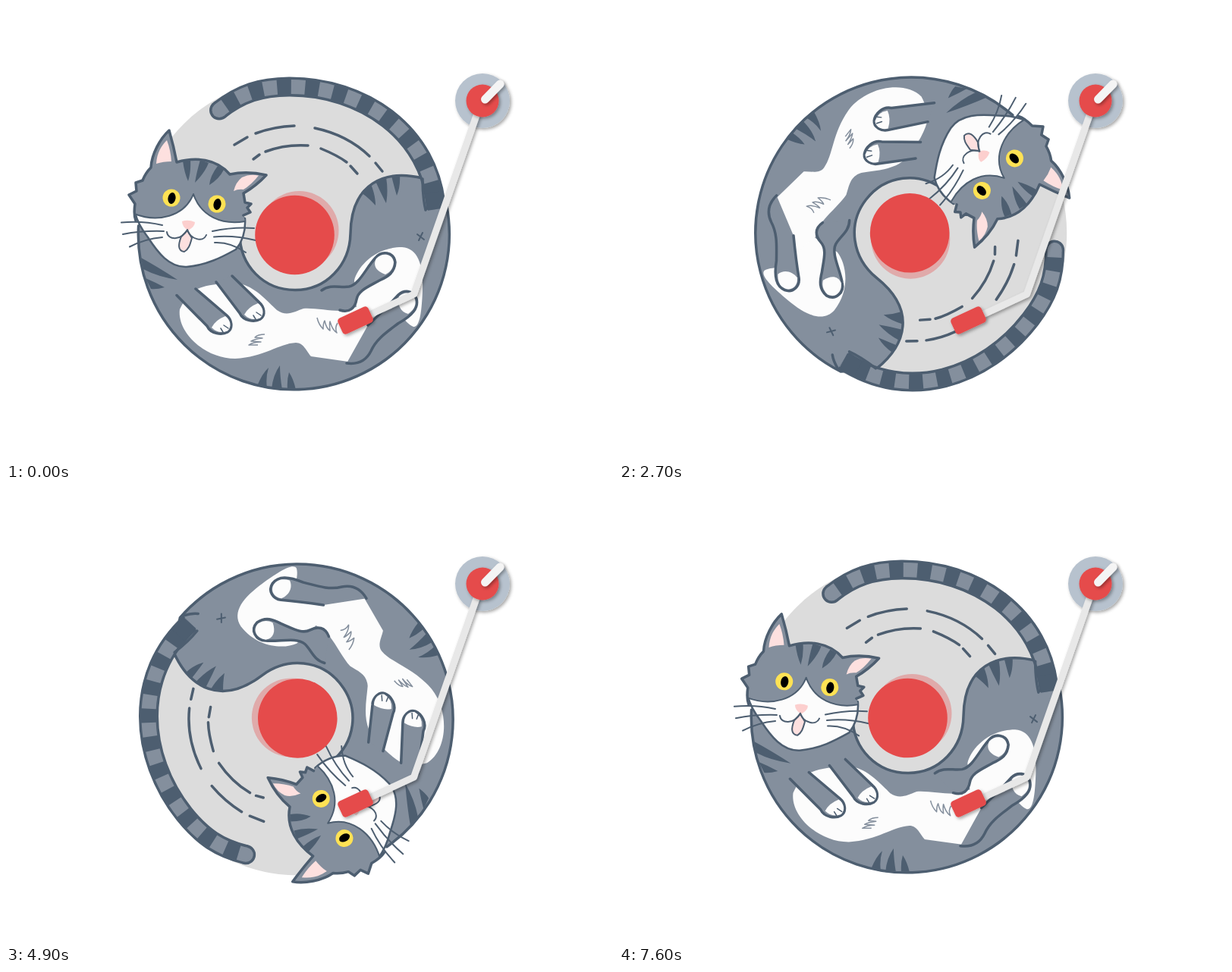
Animation of 800x600 px, one loop 7.7 s. Source, as an HTML page:

```html
<!DOCTYPE html>
<html lang="en">
<head>
<meta charset="utf-8">
<title>Cat record</title>
<style>
  html, body { margin: 0; width: 100%; height: 100%; overflow: hidden; background: #fff; }
  svg { display: block; width: 100vw; height: 100vh; }
  .line { fill: none; stroke: #4d5e70; stroke-linecap: round; stroke-linejoin: round; }
  .bold { stroke: #4d5e70; stroke-width: 3.5; stroke-linecap: round; stroke-linejoin: round; }
  .thin { stroke: #4d5e70; stroke-width: 2; stroke-linecap: round; stroke-linejoin: round; }
  .fur { fill: #848f9d; }
  .dark { fill: #4d5e70; }
  .white { fill: #fcfcfc; }
  .pink { fill: #fde0df; }
  .red { fill: #e54b4b; }
  .none { fill: none; }
</style>
</head>
<body>
<svg viewBox="0 0 800 600">
  <defs>
    <filter id="shadow" filterUnits="userSpaceOnUse" x="400" y="60" width="300" height="400">
      <feDropShadow dx="2" dy="2" stdDeviation="2" flood-color="#000" flood-opacity=".36"/>
    </filter>
    <path id="tailLine" d="M281 137.500C310 115 335 107 373 106.500C470 106 560 167 567 268"/>
  </defs>

  <g id="record">
    <circle cx="379.300" cy="301" r="205.500" fill="#dcdcdc"/>
    <path class="bold none" d="M301 183L318 173M329 168Q353 159 380 158M407 161Q450 170 479 198M487 207L496 218
      M326 202L334 196M342 192Q368 182 398 184M415 188Q437 197 449 206M454 211L463 221"/>

    <!-- body -->
    <path class="fur bold" d="M174.600 290A205 205 0 1 0 580.600 262L549 227
      C500 215 455 233 454 300C453 342 422 374.500 381 374.500C340 374.500 308 343 308 300L300 260Z"/>
    <path class="dark" d="M468 246Q478 253 487 263Q487 250 481 235ZM487 231Q494 247 501 260Q504 244 501 226Z
      M508 224Q512 240 515 250Q520 238 519 223Z
      M331 501Q338 484 346 477Q342 490 344 504ZM350 505Q352 486 361 474Q361 488 364 506ZM371 506Q370 493 373 483Q379 492 382 506Z
      M178 332Q200 344 226 361Q200 357 181 347ZM184 359Q196 364 209 371Q198 374 191 373Z"/>

    <!-- belly and hind legs -->
    <path class="white" d="M229 400C236 385 243 377 250 374C268 366 292 365 311 367C330 372 345 390 357 401
      C370 410 380 403 392 399C405 398 425 402 440 402L470 395L520 380L512 393L470 440L451 469L402 462
      C396 455 392 444 382 444C360 445 340 463 302 465C262 465 225 430 229 400Z"/>
    <path class="white" d="M459 362C463 345 485 318 522 318C545 320 550 345 549 375C548 400 546 424 537 423C530 420 526 414 520 408L462 398Z"/>
    <path class="fur bold" d="M416 375C428 366 440 372 452 370C466 367 474 346 487 332C495 322 511 324 513 338
      C512 352 503 357 492 362C478 370 464 375 462 387C460 398 453 405 440 401"/>
    <path class="white" d="M488 333C496 325 509 326 511 338C510 347 506 351 500 354C488 350 483 342 488 333Z"/>
    <path class="fur bold" d="M449 471C464 473 475 467 481 455C488 439 502 430 517 418.500C536 408 544 398 541 386
      C537 374 524 374 517 381C505 394 495 404 477 421"/>
    <path class="white" d="M518 383C525 376 536 377 539 387C541 395 537 401 530 406C520 404 515 393 518 383Z"/>
    <path class="none" stroke="#848f9d" stroke-width="1.500" stroke-linejoin="round" d="M410 411Q412 420 418 426Q418 418 420 415Q422 425 427 428Q426 419 427 416Q430 427 436 431Q433 424 437 418
      M341 433Q332 433 328 437L338 438Q328 439 323 442L336 443Q326 443 320 447L332 447"/>
    <path class="thin none" d="M542 301L551 308M549 299L544 309"/>

    <!-- tail -->
    <use href="#tailLine" class="line" style="stroke-width:26;stroke-linecap:butt"/>
    <circle class="dark" cx="281" cy="137.500" r="13"/>
    <use href="#tailLine" fill="none" stroke="#848f9d" stroke-width="19" stroke-dasharray="18.400" stroke-dashoffset="8.500"/>
    <circle class="fur" cx="281" cy="137.500" r="9.500"/>
    <path class="line" style="stroke-width:22;stroke-linecap:butt" d="M563.500 246L567 268"/>
    <path class="bold none" d="M549 228Q549 252 553 269M580 267Q576 278 570 284"/>

    <g id="forelegs"></g>

    <!-- head -->
    <path class="white thin" style="stroke-width:2.500" d="M170 272C173 285 180 296 187 305C200 325 215 345 238 344C264 342 285 331 303 321C312 310 316 296 315 280L247 246Z"/>
    <path class="fur" d="M169 274L170 261L162 249L172 244L171 233L180 230Q184 220 191 213C192 195 203 175 215 164
      Q221 185 225 206C250 199 277 201 295 222Q318 217 343 223Q330 237 313 247L315 259L323 261L318 266L322 272L313 276L315 284
      C285 289 257 278 247 248C235 278 200 286 169 274Z"/>
    <path class="thin none" d="M169 274C200 286 235 278 247 248C257 278 285 289 315 284"/>
    <path class="bold none" d="M171 283Q168 275 170 261L162 249L172 244L171 233L180 230Q184 220 191 213C192 195 203 175 215 164
      Q221 185 225 206C250 199 277 201 295 222Q318 217 343 223Q330 237 313 247L315 259L323 261L318 266L322 272L313 276"/>
    <path class="pink" d="M198 208C199 193 205 184 212 177Q217 190 218 205Q207 205 198 208Z
      M300 244Q303 232 311 226Q321 221 333 223.500Q323 236 313 242Q306 241 300 244Z"/>
    <path class="dark" d="M233 204Q235 220 240 231Q244 218 243 203ZM256 203Q251 220 249 233Q262 220 267 207ZM279 211Q269 224 268 236Q281 228 287 216Z"/>
    <g id="eyes"></g>
    <path fill="#fccfce" d="M232 284Q240 281 249 285Q249 291 240 296Q232 291 232 284Z"/>
    <path class="pink thin" d="M239 296L231 304C227 314 226 323 235 324C242 320 243 312 245 306Z"/>
    <path class="thin none" d="M212 298C213 309 231 310 239 295C243 308 260 312 264 302"/>
    <path class="thin none" d="M152 285.500Q180 283 206 289M154 301Q180 296 208 297M163 317.500Q183 307 206 305
      M272 297Q300 291 327 293M274 304.500Q300 302 329 309M275 312Q296 311 316 325"/>

    <!-- label -->
    <circle class="red" cx="386.500" cy="296" r="52" opacity=".35"/>
    <circle class="red" cx="380.500" cy="302" r="52.300"/>
  </g>

  <!-- tonearm -->
  <circle cx="628" cy="125" r="36" fill="#b7c2ce" filter="url(#shadow)"/>
  <path d="M625 130L537.500 380L475 409" fill="none" stroke="#e8e8e8" stroke-width="9" stroke-linejoin="round" filter="url(#shadow)"/>
  <g filter="url(#shadow)">
    <rect class="red" x="-22" y="-11.500" width="44" height="23" rx="4.500" transform="translate(460.500 414.500) rotate(-25)"/>
  </g>
  <circle class="red" cx="628" cy="125" r="21.500" filter="url(#shadow)"/>
  <path d="M631.500 123L651 103" stroke="#f4f4f4" stroke-width="11" stroke-linecap="round" filter="url(#shadow)"/>
</svg>
<script>
  const LOOP = 7700, STEP = 100;
  const DEG_PER_MS = 359.7 / 7600;
  const byId = id => document.getElementById(id);

  const eye = (x, y) => `<circle cx="${x}" cy="${y}" r="11.500" fill="#ffe254"/>
    <ellipse rx="5" ry="7.500" transform="translate(${x + .5} ${y + .5}) rotate(10)"/>`;

  // Centred on the paw; lower and upper are where the leg's two edges begin.
  const foreleg = (x, y, lower, upper) => `<g transform="translate(${x} ${y})">
    <path class="fur bold" d="M${lower}L-18 1C-13 12 2 13 9 9C17 4 14 -8 8 -13L${upper}"/>
    <path class="white" d="M-12 3Q-7 -7 6 -12C13 -7 15 2 9 7.500Q-3 12 -12 3Z"/>
    <path class="thin none" style="stroke-width:1.500" d="M0 4L3 9M4 0L10 4"/></g>`;

  byId('eyes').innerHTML = eye(218, 253) + eye(278, 261);
  byId('forelegs').innerHTML = foreleg(283, 421, '-58 -39.5', '-33 -48') + foreleg(326, 404, '-49 -40', '-28 -48');

  const record = byId('record');
  function draw(ms) {
    const t = Math.floor(ms % LOOP / STEP) * STEP;
    record.setAttribute('transform', `rotate(${t * DEG_PER_MS} 382.5 301.3)`);
  }

  const start = performance.now();
  function tick() {
    draw(performance.now() - start);
    requestAnimationFrame(tick);
  }
  tick();
</script>
</body>
</html>
```
